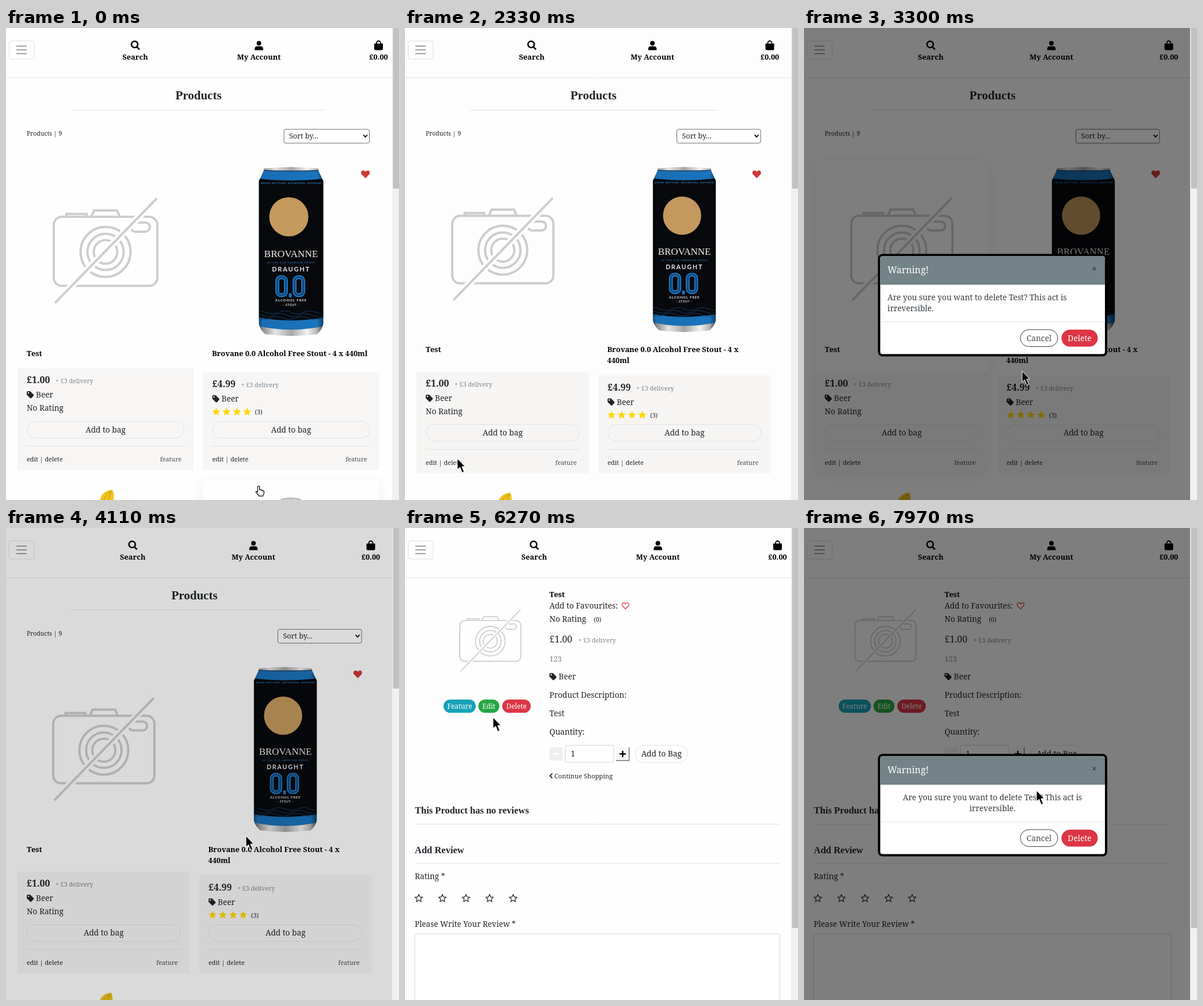
Recreate the animation shown at these times as an HTML page with a canvas. Size 683 by 820 pixels, loop 8000 ms.

```html
<!DOCTYPE html>
<html lang="en">
<head>
<meta charset="utf-8">
<title>Products</title>
<style>
  html, body { margin: 0; width: 100%; height: 100%; overflow: hidden; background: #fefefe; }
  canvas { display: block; }
</style>
</head>
<body>
<canvas id="stage" width="683" height="820"></canvas>
<script>
const ctx = document.getElementById('stage').getContext('2d');
const LOOP = 8000, PAGE_W = 671;
const SERIF = '"Noto Serif", serif', DISPLAY = '"Liberation Serif", serif', SANS = 'Lato, sans-serif';
const INK = '#212529', GREY = '#7b858c', RULE = '#dee2e6', RED = '#dc3545', PAPER = '#fefefe';
let narrow = false;
const pick = (wide, slim) => narrow ? slim : wide;
const within = (t, a, b) => t >= a && t < b;
const ramp = (t, a, b) => Math.min(1, Math.max(0, (t - a) / (b - a)));

// ---------- drawing helpers ----------
function text(str, x, y, o = {}) {
  const { size = 13.7, color = INK, weight = 400, align = 'left', family = SERIF, spacing = 0 } = o;
  ctx.font = `${weight} ${size}px ${family}`;
  ctx.letterSpacing = spacing + 'px';
  ctx.textAlign = align;
  ctx.fillStyle = color;
  ctx.fillText(str, x, y);
}

function paint(path, fill, stroke, width = 1) {
  if (fill) { ctx.fillStyle = fill; ctx.fill(path); }
  if (stroke) { ctx.strokeStyle = stroke; ctx.lineWidth = width; ctx.stroke(path); }
}

function box(x, y, w, h, r, fill, stroke, width) {
  const p = new Path2D();
  p.roundRect(x, y, w, h, r);
  paint(p, fill, stroke, width);
}

function at(x, y, scale, draw) {
  ctx.save();
  ctx.translate(x, y);
  ctx.scale(scale, scale);
  draw();
  ctx.restore();
}

const icon = (d, x, y, fill, stroke, width) =>
  at(x, y, 1, () => paint(new Path2D(d), fill, stroke, width));

const rule = (x1, x2, y, color = '#dfe1e3') => icon(`M${x1} 0H${x2}`, 0, y, null, color);

function star(x, y, r, fill, stroke) {
  let d = '';
  for (let i = 0; i < 10; i++) {
    const a = i * Math.PI / 5 - Math.PI / 2, k = i % 2 ? r * 0.48 : r;
    d += `${i ? 'L' : 'M'}${k * Math.cos(a)} ${k * Math.sin(a)}`;
  }
  icon(d + 'z', x, y, fill, stroke, 1.2);
}

const HEART = 'M0 7L-6.6 .2C-9-3-6.5-6.8-3.500-6.500Q-1-6.300 0-4.200Q1-6.300 3.500-6.500C6.500-6.800 9-3 6.600 .2z';
const TAG = 'M0 1.500Q0 0 1.500 0H6L12 6Q13 7 12 8L8 12Q7 13 6 12L0 6zM3 1.600a1.300 1.300 0 1 0 .01 0z';
const ARROW = 'M0 0V19L4.500 15.200L8.300 24.500L11.700 23L7.900 14H13.500z';
const HAND = 'M-1.700 1.500a1.700 1.700 0 0 1 3.400 0v5c.5-1 3-.8 3 .8c.6-.8 2.600-.5 2.600 1c.7-.6 2.200 0 2.200 1.400' +
  'c0 4-.5 5.500-2 7.500h-7c-1-3-3-4-5-6.500c-.8-1.500 1-2.400 2.800-.2z';

function tag(x, y) {
  at(x, y, 1, () => { ctx.fillStyle = INK; ctx.fill(new Path2D(TAG), 'evenodd'); });
}

function pill(label, x, y, w, h, o = {}) {
  const { fill, stroke, color = INK, size = 13.7, width } = o;
  box(x, y, w, h, h / 2, fill, stroke, width);
  text(label, x + w / 2, y + h / 2 + size * 0.36, { color, size, align: 'center' });
}

// ---------- pictures ----------
function camera(x, y, scale, lineWidth) {
  at(x, y, scale, () => {
    const w = lineWidth / scale, c = '#cdcdcd';
    box(-90, -59, 180, 120, 14, null, c, w);
    paint(new Path2D('M-68-59V-64H-33V-59M-25-59L-20-70H20L25-59'), null, c, w);
    box(44, -49, 33, 16, 8, null, c, w);
    for (const r of [43.5, 31.5, 20.5]) {
      const ring = new Path2D();
      ring.arc(0, 2, r, 0, 7);
      paint(ring, null, c, w);
    }
    const slash = new Path2D('M-88 91L89-91');
    paint(slash, null, PAPER, w * 3);
    paint(slash, null, c, w);
  });
}

function can(x, y, scale) {
  at(x, y, scale, () => {
    const metal = ctx.createLinearGradient(-56, 0, 56, 0);
    ['#777', '#eee', '#aaa', '#f4f4f4', '#888'].forEach((c, i) => metal.addColorStop(i / 4, c));
    const body = new Path2D('M-47 2Q0-3 47 2L48 7L56 24V272Q54 282 45 290Q0 296-45 290Q-54 282-56 272V24L-48 7z');
    paint(body, metal);
    ctx.save();
    ctx.clip(body);
    paint(new Path2D('M-56 5Q0 8 56 5V276Q0 288-56 276z'), '#1b74bd');
    paint(new Path2D('M-56 5Q0 8 56 5'), null, '#12395c', 1.5);
    paint(new Path2D('M-56 20Q0 26 56 20V261Q0 271-56 261z'), '#08090d');
    for (let row = 0; row < 3; row++) {
      let d = '';
      for (let wx = -56; wx <= 56; wx += 2)
        d += `${d ? 'L' : 'M'}${wx} ${252 + row * 5 + 2.5 * Math.sin(wx / 7 + row)}`;
      paint(new Path2D(d), null, '#16406e');
    }
    const shade = ctx.createLinearGradient(-56, 0, 56, 0);
    [[0, .35], [.06, .05], [.9, 0], [1, .45]].forEach(([s, a]) => shade.addColorStop(s, `rgba(0,0,0,${a})`));
    paint(body, shade);
    ctx.restore();

    const label = (s, ly, size, color, o = {}) =>
      text(s, 0, ly, { size, color, align: 'center', family: SANS, weight: 700, ...o });
    label('DRINK ANYTIME, ANYWHERE, ANYHOW', 29, 4.5, '#2d7fc4', { spacing: .6 });
    box(-38, 52, 68, 68, 34, '#c49a5e');
    label('BROVANNE', 156, 17.3, '#f3f0ea', { family: DISPLAY, weight: 400 });
    label('OF THE OLD HARBOUR HOUSE', 167, 4.5, '#2d6aa5', { spacing: .7 });
    label('DRAUGHT', 181, 11, '#e8e8e8', { spacing: 1.8 });
    for (const zx of [-24, 6]) {
      box(zx, 191, 15, 31, 6, null, '#1c72bb', 7);
      box(zx, 191, 15, 31, 6, null, '#0b3a66', 2);
    }
    box(-4, 219, 5, 7, 1, '#1c72bb');
    label('ALCOHOL FREE', 233, 6, '#e8e8e8', { spacing: .9 });
    label('- STOUT -', 241, 5, '#e8e8e8', { spacing: .6 });
  });
}

function lemon(x, y) {
  icon('M0 20Q4 3 22 1Q26 9 23 24H0z', x, y, '#f0c31c');
  icon('M6 22Q9 9 20 4M13 24L20 4', x, y, null, '#b98f14');
}

// ---------- page parts ----------
function header() {
  box(5.5, 22.5, 43.5, 31.5, 3.5, null, '#dedede');
  for (const y of [31.5, 38, 44.5]) icon('M18 0H36', 0, y, null, '#777', 1.4);

  const search = pick(224.5, 220.2), account = pick(439.5, 430), bag = pick(647.5, 634);
  icon('M4.500-1.500a5.500 5.500 0 1 1-11 0a5.500 5.500 0 1 1 11 0M2.700 2.500L7.500 7.300', search, 30, null, '#000', 2.6);
  icon('M4-4a4 4 0 1 1-8 0a4 4 0 1 1 8 0M-7.300 8V5.500Q-7 1.200-3 1.200H3Q7 1.200 7.300 5.500V8z', account, 30.500, '#000');
  icon('M-7.500-3H7.500V6Q7.500 8.500 5 8.500H-5Q-7.500 8.500-7.500 6z', bag, 30, '#000');
  icon('M-3.500 0V-4a3.500 3.500 0 0 1 7 0V0', bag, 30, null, '#000', 1.8);
  [['Search', search], ['My Account', account], ['£0.00', bag]].forEach(([s, x]) =>
    text(s, x, 55, { size: 12.8, weight: 700, align: 'center', color: '#000' }));
  rule(0, PAGE_W, 86.5, RULE);
}

function scrollbar(thumb) {
  ctx.fillStyle = '#f1f1f1';
  ctx.fillRect(PAGE_W, 0, 12, 820);
  ctx.fillStyle = '#c1c1c1';
  ctx.fillRect(672.5, 0, 10.5, thumb);
}

function cardShadow(x, y, w, h) {
  ctx.save();
  ctx.shadowColor = 'rgba(0,0,0,.07)';
  ctx.shadowBlur = 22;
  ctx.shadowOffsetY = 5;
  ctx.fillStyle = PAPER;
  ctx.fillRect(x, y, w, h);
  ctx.restore();
}

function productPanel(x, top, price, rated) {
  const w = pick(306, 299.5), bottom = pick(768, 773.5), left = x + 16, inner = w - 32;
  ctx.fillStyle = '#f7f6f5';
  ctx.fillRect(x, top, w, bottom - top);
  text(price, left, top + 26, { size: 16, weight: 600 });
  text('+ £3 delivery', left + 50, top + 26, { size: 10.7, color: GREY });
  tag(left, top + 40);
  text('Beer', left + 16, top + 51);
  if (rated) {
    for (let i = 0; i < 4; i++) star(left + 7 + i * 17.8, top + 69, 7.3, '#ffd700');
    text('(3)', left + 74, top + 73, { size: 10.5 });
  } else text('No Rating', left, top + 73.5);
  pill('Add to bag', left + .5, bottom - 84.5, inner - 1, 29, { stroke: RULE });
  rule(left, left + inner, bottom - 41.5);
  text('edit | delete', left, bottom - 15, { size: 10.85 });
  text('feature', left + inner - 5, bottom - 15, { size: 10.8, color: '#4a5056', align: 'right' });
}

function productList(hovered) {
  const x2 = pick(342.5, 336);
  if (hovered === 'first') cardShadow(20, 230, pick(306, 300), pick(538, 543));
  if (hovered === 'next') cardShadow(x2, 785, pick(306, 300), 60);

  text('Products', pick(334.5, 327.5), 123.5, { size: 21, weight: 700, family: DISPLAY, align: 'center' });
  rule(pick(114, 112), pick(554, 544), 142.5);
  text('Products | 9', 36, 187, { size: 10.5 });

  const sx = pick(483, 472.5), sw = pick(148.5, 145.5);
  box(sx, 176, sw, 24, 3, '#fff', '#6b6b6b');
  text('Sort by...', sx + 9, 192, { size: 12.6 });
  icon('M-3.500-2L0 1.800L3.500-2', sx + sw - 7, 187.5, null, '#000', 1.8);

  camera(pick(173, 170), pick(387, 384), pick(1, .977), 4);
  can(pick(495.5, 485.5), 242, pick(1, .977));
  icon(HEART, pick(624.7, 611.3), 254, '#cc3a35');

  const title = { size: 12.8, weight: 700, color: '#000' }, titleY = pick(570, 563);
  text('Test', 36, titleY, title);
  const name = 'Brovane 0.0 Alcohol Free Stout - 4 x';
  text(pick(name + ' 440ml', name), x2 + 15.5, titleY, title);
  if (narrow) text('440ml', x2 + 15.5, 582, title);

  productPanel(20, pick(591, 597), '£1.00', false);
  productPanel(x2, pick(598, 603.5), '£4.99', true);

  lemon(pick(163, 161), pick(801, 806));
  if (!narrow) icon('M-19 5Q-17 1 0 .5Q17 1 19 5z', 495, 816, '#c9c9c9', '#9a9a9a');
}

function productDetail(deleteState) {
  ctx.save();
  ctx.translate(pick(0, -6.8), 0);
  camera(148.3, 195.5, .59, 1.8);
  const button = { color: '#fff', size: 11.8 };
  pill('Feature', 67, 298, 56, 23, { ...button, fill: '#17a2b8' });
  pill('Edit', 127.5, 298, 36.5, 23, { ...button, fill: '#28a745' });
  pill('Delete', 169, 298, 49.5, 23, {
    ...button, fill: deleteState ? '#c02a38' : RED,
    stroke: deleteState === 'focus' ? '#000' : null, width: 2
  });

  const x = 251;
  text('Test', x, 120, { size: 12.8, weight: 700, color: '#000' });
  text('Add to Favourites:', x, 140);
  at(383.2, 135, .8, () => paint(new Path2D(HEART), null, '#d9342b', 1.6));
  text('No Rating', x, 163);
  text('(0)', 328, 163, { size: 10.5 });
  text('£1.00', x, 199, { size: 16 });
  text('+ £3 delivery', 301, 199, { size: 10.7, color: GREY });
  text('123', x, 231.5, { size: 12.8, color: GREY });
  tag(x, 252);
  text('Beer', 267, 263);
  text('Product Description:', x, 295);
  text('Test', x, 327);
  text('Quantity:', x, 359);

  box(251, 381, 23, 23, 2, '#efefef');
  icon('M-5.500 0H5.500', 262.5, 392.5, null, '#fff', 2.4);
  box(278.5, 377.5, 84.5, 29.5, 3, '#fff', '#ced4da');
  text('1', 288, 397);
  box(367, 381, 22, 23, 1, '#f8f8f8');
  icon('M0 23H22.500V0', 367, 381, null, '#6b6b6b', 1.4);
  icon('M-5.500 0H5.500M0-5.500V5.500', 378.3, 392.5, null, '#000', 2.4);
  pill('Add to Bag', 400.5, 377.5, 90.5, 30, { stroke: RULE });
  icon('M4-4L0 0L4 4', 252, 430.5, null, INK, 1.8);
  text('Continue Shopping', 259.5, 435, { size: 11.2 });
  ctx.restore();

  const right = pick(651.5, 638), heading = { size: 16.5, weight: 700, family: DISPLAY };
  text('This Product has no reviews', 17, 496, heading);
  rule(17, right, 514.5);
  text('Add Review', 17, 564.5, heading);
  rule(17, right, 582.5);
  text('Rating *', 17, 609.5);
  for (let i = 0; i < 5; i++) star(24 + i * 41, 643.5, 6.8, null, INK);
  text('Please Write Your Review *', 17, 692.5, { size: 13.5 });
  box(17, 705, right - 17, 150, 4, '#fff', '#ced4da');
}

function modal(alpha, slide, centered, cancelHover) {
  if (!alpha) return;
  ctx.save();
  ctx.globalAlpha = alpha;
  ctx.translate(0, -40 * (1 - slide));
  box(128.5, 392.5, 398.5, 178, 8, '#000');
  box(132.5, 396.5, 390.5, 170, 4, '#fff');
  box(132.5, 396.5, 390.5, 49.5, [4, 4, 0, 0], '#748387');
  text('Warning!', 145, 426, { size: 16, weight: 500, color: '#fff' });
  text('×', 504.5, 424, { size: 16, weight: 700, align: 'center', color: '#32393b' });
  const body = { align: centered ? 'center' : 'left', color: '#343a40' }, x = centered ? 327.5 : 145;
  text('Are you sure you want to delete Test? This act is', x, 473, body);
  text('irreversible.', x, 492, body);
  rule(132.5, 523, 510.5, RULE);
  pill('Cancel', 376, 524, 65, 29.5, {
    stroke: '#343a40', fill: cancelHover ? '#343a40' : null, color: cancelHover ? '#fff' : '#4a5056', size: 13.8
  });
  pill('Delete', 447.5, 524, 63, 29.5, { fill: RED, color: '#fff', size: 13.8 });
  ctx.restore();
}

// ---------- pointer ----------
const TRACK = [ // time, x, y
  [260, 439, 796], [1010, 86, 744], [1080, 86, 744], [1270, 110, 783], [1500, 195, 696], [1700, 45, 742],
  [1920, 88, 748], [2330, 91, 748], [2870, 98, 747], [3300, 379, 596], [3630, 418, 535], [4180, 417, 535],
  [4520, 209, 424], [4860, 209, 424], [5060, 211, 430], [5470, 211, 429], [5660, 162, 352], [5800, 160, 348],
  [6000, 134, 342], [6270, 153, 329], [6480, 260, 278], [6630, 240, 277], [6760, 210, 276], [6900, 208, 278],
  [7020, 202, 302], [7400, 202, 302], [7900, 353, 412], [7970, 404, 456]
];
const HAND_TIMES = [[0, 2300], [3560, 3840], [4400, 5060], [6960, 7230]];

function pointer(t) {
  const i = TRACK.findIndex(k => k[0] > t);
  let [, x, y] = TRACK[i < 0 ? TRACK.length - 1 : Math.max(0, i - 1)];
  if (i > 0) {
    const [t0] = TRACK[i - 1], [t1, x1, y1] = TRACK[i], u = ramp(t, t0, t1), k = u * u * (3 - 2 * u);
    x += (x1 - x) * k;
    y += (y1 - y) * k;
  }
  const hand = HAND_TIMES.some(([a, b]) => within(t, a, b));
  ctx.lineJoin = 'round';
  if (hand) icon(HAND, x, y, '#fff', '#000', 1.2);
  else icon(ARROW, x, y, '#000', '#fff', 1);
  ctx.lineJoin = 'miter';
}

// ---------- timeline ----------
function render(t) {
  const detail = t >= 5060, leaving = detail ? 0 : ramp(t, 3830, 4010);
  narrow = within(t, 2300, 4170) || t >= 7200;
  ctx.fillStyle = PAPER;
  ctx.fillRect(0, 0, 683, 820);
  header();
  if (detail) productDetail(within(t, 7160, 7400) ? 'focus' : within(t, 6960, 7160) ? 'hover' : '');
  else productList(t < 500 ? 'next' : within(t, 800, 2300) || within(t, 2400, 3830) || t > 4400 ? 'first' : '');

  const opened = detail ? 7240 : 2330;
  const dim = .5 * ramp(t, opened, opened + 150) * (detail ? 1 : 1 - ramp(t, 4010, 4150));
  ctx.fillStyle = `rgba(0,0,0,${dim})`;
  ctx.fillRect(0, 0, PAGE_W, 820);

  const shown = ramp(t, opened + 150, opened + 300), slid = 1 - (1 - ramp(t, opened + 150, opened + 450)) ** 2;
  modal(shown * (1 - leaving), slid * (1 - leaving), detail, within(t, 3560, 3840));
  scrollbar(detail ? 695 : 279);
  pointer(t);
}

const start = performance.now();
(function frame() {
  render((performance.now() - start) % LOOP);
  requestAnimationFrame(frame);
})();
</script>
</body>
</html>
```
